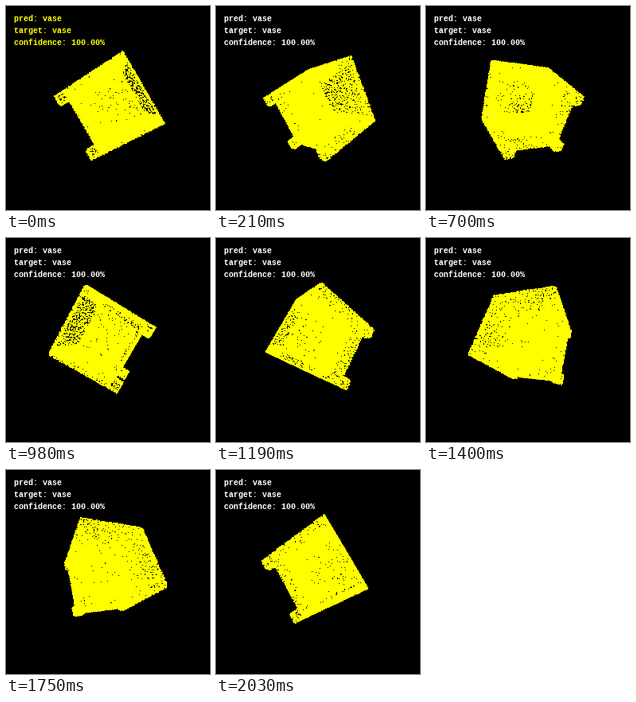
Recreate the animation shown at these times as a matplotlib script. Size 256 by 256 pixels, loop 2100 ms.

```python
import numpy as np
import matplotlib.pyplot as plt
from matplotlib.animation import FuncAnimation

SIZE, FRAMES, STEP = 256, 30, 70
FOCAL = SIZE / 2 / np.tan(np.radians(30))
DENSITY, RADIUS = 0.19, 1.08
rng = np.random.default_rng(4)


def quad(a, b, c, d):
    """Jittered points over the quad a-b-c-d."""
    a, b, c, d = (np.array(p, float) for p in (a, b, c, d))
    w = (np.linalg.norm(b - a) + np.linalg.norm(c - d)) / 2
    h = (np.linalg.norm(d - a) + np.linalg.norm(c - b)) / 2
    nx = max(2, round(w * DENSITY ** 0.5))
    ny = max(2, round(h * DENSITY ** 0.5))
    s, t = np.meshgrid(np.arange(nx), np.arange(ny))
    s = ((s.ravel() + rng.random(nx * ny)) / nx)[:, None]
    t = ((t.ravel() + rng.random(nx * ny)) / ny)[:, None]
    return (1 - t) * ((1 - s) * a + s * b) + t * ((1 - s) * d + s * c)


def ring(h, r, cx=0, cy=0):
    return [(h, cx + r * i, cy + r * j)
            for i, j in ((1, 1), (-1, 1), (-1, -1), (1, -1))]


def band(lo, hi):
    """Four walls joining two square rings."""
    return [quad(lo[k], lo[k - 1], hi[k - 1], hi[k]) for k in range(4)]


def planter():
    top, base = ring(42, 42.5), ring(-31, 39)
    mouth, floor = ring(42, 33.5), ring(-22, 28)
    parts = band(base, top) + band(floor, mouth) + band(mouth, top)
    parts += [quad(*base), quad(*floor)]
    for i in (-1, 1):
        for j in (-1, 1):
            foot = [ring(h, 5.5, 33.2 * i, 33.2 * j) for h in (-42, -31)]
            parts += band(*foot) + [quad(*foot[0])]
    return np.vstack(parts)


def tilt(p, deg=30):
    c, s = np.cos(np.radians(deg)), np.sin(np.radians(deg))
    h, v, w = p.T
    return h * c - v * s, h * s + v * c, w


X, Y, Z = tilt(planter())


def render(i):
    a = 2 * np.pi * i / FRAMES
    x = X * np.cos(a) + Z * np.sin(a)
    z = Z * np.cos(a) - X * np.sin(a)
    k = FOCAL / (FOCAL - z)
    px, py = SIZE / 2 + x * k, SIZE / 2 - Y * k
    img = np.zeros((SIZE, SIZE, 3))
    for dx in (-1, 0, 1):
        for dy in (-1, 0, 1):
            cx, cy = np.floor(px) + dx, np.floor(py) + dy
            hit = np.hypot(cx + 0.5 - px, cy + 0.5 - py) < RADIUS
            img[cy[hit].astype(int), cx[hit].astype(int)] = (1, 1, 0)
    return img


fig = plt.figure(figsize=(SIZE / 100, SIZE / 100), dpi=100, facecolor="black")
ax = fig.add_axes([0, 0, 1, 1])
ax.axis("off")
view = ax.imshow(render(0), extent=(0, SIZE, SIZE, 0), interpolation="nearest")
lines = ("pred: vase", "target: vase", "confidence: 100.00%")
labels = [ax.text(9.5, 19 + 15 * n, s, family="Liberation Mono", size=7.2,
                  weight="bold", va="baseline", color="white")
          for n, s in enumerate(lines)]


def update(i):
    view.set_data(render(i))
    for label in labels:
        label.set_color("white" if i else "yellow")
    return [view, *labels]


anim = FuncAnimation(fig, update, frames=FRAMES, interval=STEP,
                     repeat=True, repeat_delay=0)
plt.show()
```
